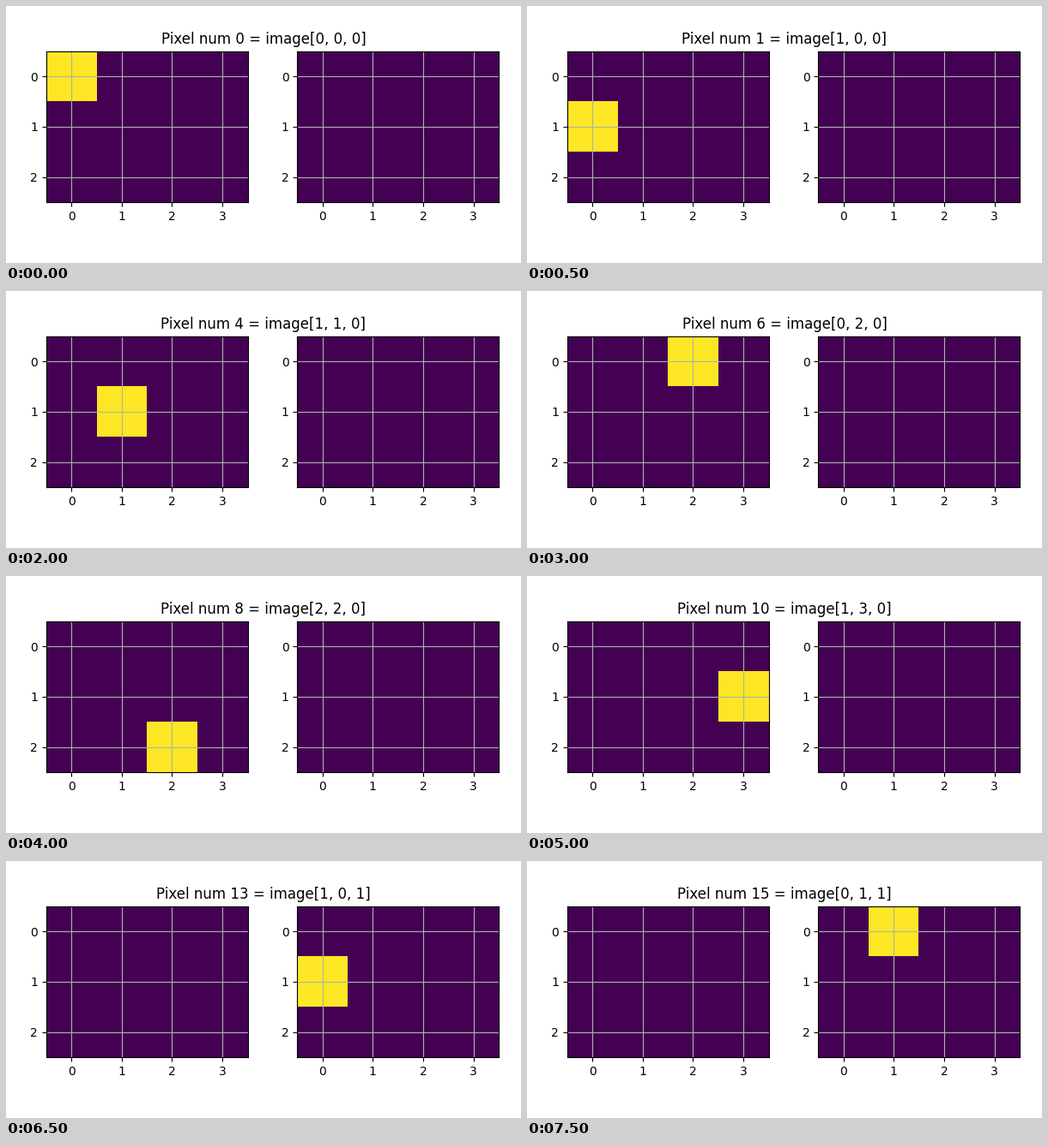
Animation of 600 by 300 pixels, one loop 8000 ms. Source, as a matplotlib script:

```python
import matplotlib.pyplot as plt
import numpy as np
from matplotlib.animation import FuncAnimation

SHAPE = (3, 4, 2)
FRAMES = 16
INTERVAL = 500

fig, axes = plt.subplots(1, 2, figsize=(6, 3), dpi=100)
fig.tight_layout()
title = fig.suptitle("", y=0.9)


def make_slice(ax):
    im = ax.imshow(np.zeros(SHAPE[:2]), vmin=0, vmax=1)
    ax.set_xticks(range(SHAPE[1]))
    ax.set_yticks(range(SHAPE[0]))
    ax.grid(True)
    return im


slices = [make_slice(ax) for ax in axes]


def update(num):
    # The first index varies fastest
    i, j, k = (int(n) for n in np.unravel_index(num, SHAPE, order="F"))
    image = np.zeros(SHAPE)
    image[i, j, k] = 1
    for z, im in enumerate(slices):
        im.set_data(image[:, :, z])
    title.set_text(f"Pixel num {num} = image[{i}, {j}, {k}]")
    return [*slices, title]


anim = FuncAnimation(fig, update, frames=FRAMES, interval=INTERVAL,
                     repeat=True, repeat_delay=0, blit=False)
plt.show()
```
